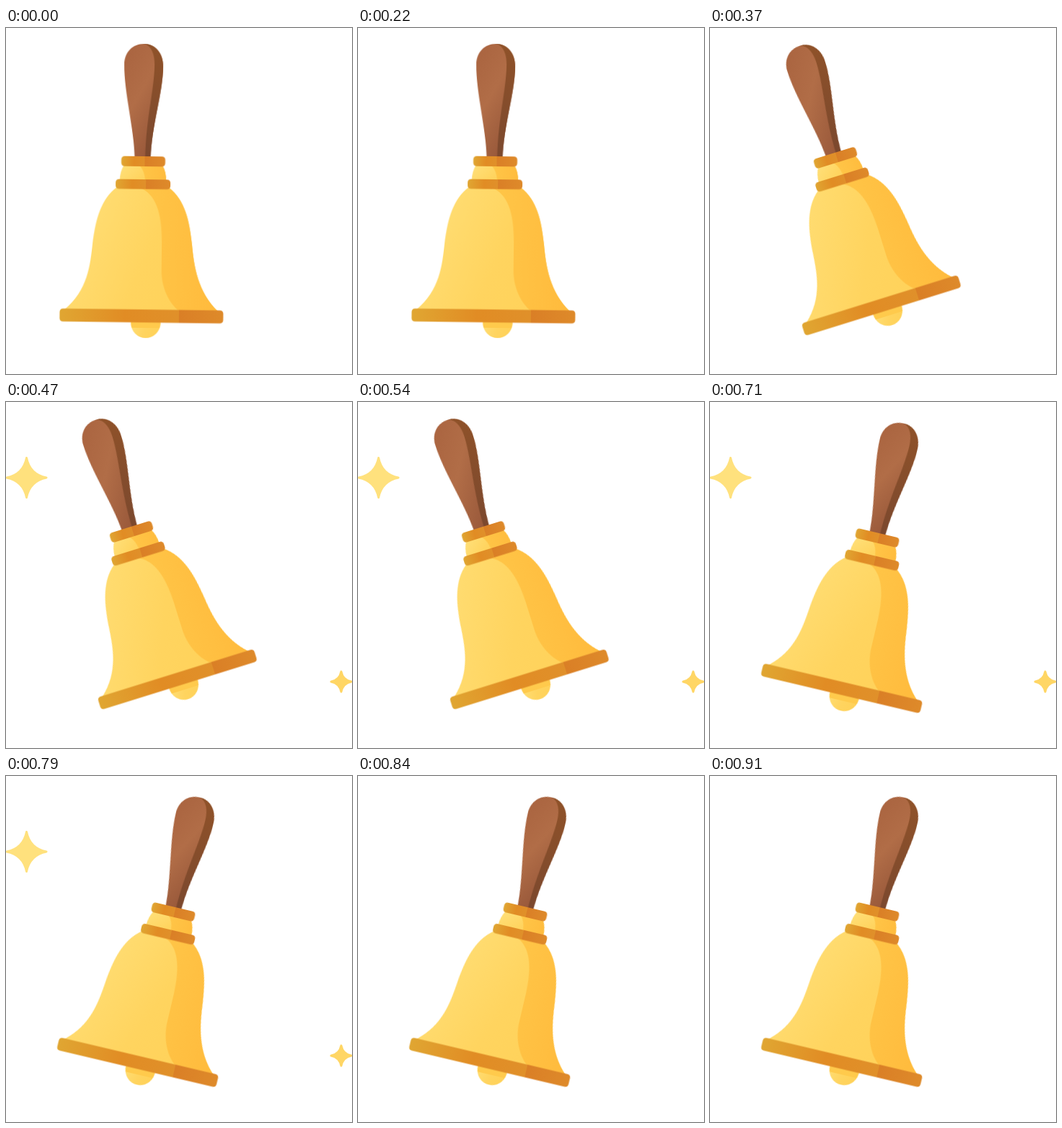
Animation, 480 px wide and 480 px high, one loop 1.04 s. Source, as an HTML page:

```html
<!DOCTYPE html>
<html lang="en">
<head>
<meta charset="utf-8">
<title>Ringing bell</title>
<style>
  html, body { margin: 0; width: 100%; height: 100%; overflow: hidden; background: #fff; }
  svg { display: block; width: 100%; height: 100%; }
  #stars path { stroke-width: 3; stroke-linejoin: round; }
</style>
</head>
<body>
<svg viewBox="0 0 480 480">
  <defs>
    <linearGradient id="wood" x2="0.6" y2="1">
      <stop stop-color="#a9633f"/><stop offset=".5" stop-color="#b16d47"/><stop offset="1" stop-color="#98583a"/>
    </linearGradient>
    <linearGradient id="woodShade" x2="0" y2="1">
      <stop stop-color="#8f5229"/><stop offset="1" stop-color="#7b482e"/>
    </linearGradient>
    <linearGradient id="gold" x2="1" y2=".35">
      <stop stop-color="#ffe07a"/><stop offset=".65" stop-color="#ffd45f"/><stop offset="1" stop-color="#ffd25a"/>
    </linearGradient>
    <linearGradient id="goldShade">
      <stop stop-color="#ffc648"/><stop offset="1" stop-color="#ffba3c"/>
    </linearGradient>
    <linearGradient id="band">
      <stop stop-color="#e0a632"/><stop offset=".55" stop-color="#e18c24"/><stop offset="1" stop-color="#e0902a"/>
    </linearGradient>
    <linearGradient id="bandShade">
      <stop stop-color="#da7f26"/><stop offset="1" stop-color="#de8a2a"/>
    </linearGradient>
    <clipPath id="handleClip"><path id="handle" d="M-1-163C15-163 26-150 26-132C26-95 11-50 10-4H-12C-13-45-28-95-28-134C-28-151-17-163-1-163Z"/></clipPath>
    <clipPath id="bodyClip"><path id="body" d="M-36 36C-58 53-65 80-69 115C-72 145-75 180-107 207H106C78 180 72 145 69 115C65 80 58 53 36 36Z"/></clipPath>
    <clipPath id="neckClip"><path id="neck" d="M-27 6Q-32 14-32.500 27H32Q32 14 27 6Z"/></clipPath>
    <clipPath id="clapperClip"><circle id="clapper" cx="6" cy="224.500" r="20.500"/></clipPath>
  </defs>

  <g id="stars"></g>

  <g id="bell">
    <use href="#clapper" fill="url(#gold)"/>
    <rect x="-20" y="205" width="52" height="26" fill="#ffca4c" clip-path="url(#clapperClip)"/>

    <use href="#handle" fill="url(#wood)"/>
    <path d="M-1-163C10-160 14-148 14-134C14-100 3-60 2.500-4H40V-163Z" fill="url(#woodShade)" clip-path="url(#handleClip)"/>

    <use href="#neck" fill="url(#gold)"/>
    <path d="M-5 6Q2 13 3 27H40V6Z" fill="url(#goldShade)" clip-path="url(#neckClip)"/>

    <use href="#body" fill="url(#gold)"/>
    <path d="M-6 36C18 44 27 72 27 112V150C27 175 38 196 52 207H110V36Z" fill="url(#goldShade)" clip-path="url(#bodyClip)"/>
    <g id="bands"></g>
  </g>
</svg>
<script>
const DURATION = 1040;
const byId = id => document.getElementById(id);

function add(parent, tag, attrs) {
  const node = document.createElementNS('http://www.w3.org/2000/svg', tag);
  for (const key in attrs) node.setAttribute(key, attrs[key]);
  parent.append(node);
}

// Band split at x into a lit left part and a shaded right part.
function band(half, centerY, height, split) {
  const r = 5, top = centerY - height / 2, bottom = top + height;
  const side = (end, sign, fill) => add(byId('bands'), 'path', {
    fill,
    d: `M${split} ${top}H${end - sign * r}Q${end} ${top} ${end} ${top + r}` +
       `V${bottom - r}Q${end} ${bottom} ${end - sign * r} ${bottom}H${split}Z`
  });
  side(-half, -1, 'url(#band)');
  side(half, 1, 'url(#bandShade)');
}

function star(x, y, size, color) {
  const c = size / 6;
  add(byId('stars'), 'path', {
    transform: `translate(${x} ${y})`, fill: color, stroke: color,
    d: `M0 ${-size}Q${c} ${-c} ${size} 0Q${c} ${c} 0 ${size}Q${-c} ${c} ${-size} 0Q${-c} ${-c} 0 ${-size}Z`
  });
}

// Each row is [start in ms, value]; values hold until the next row.
function hold(id, property, rows) {
  const frames = [...rows, [DURATION, rows[0][1]]].map(([time, value]) =>
    ({ offset: time / DURATION, [property]: value, easing: 'step-end' }));
  byId(id).animate(frames, { duration: DURATION, iterations: Infinity });
}

const pose = (x, y, angle) => `translate(${x}px, ${y}px) rotate(${angle}deg)`;

band(30.5, 0, 14, 2);
band(38, 31.7, 13.5, 4);
band(113.5, 214.5, 18, 52);
star(28.5, 105, 27.5, '#ffe17d');
star(465, 388, 14, '#ffd665');

hold('bell', 'transform', [
  [0, pose(190.5, 185, 0.7)],
  [370, pose(174, 180, -17.3)],
  [710, pose(232, 188.5, 13.3)]
]);
hold('stars', 'opacity', [[0, 0], [470, 1], [840, 0]]);
</script>
</body>
</html>
```
